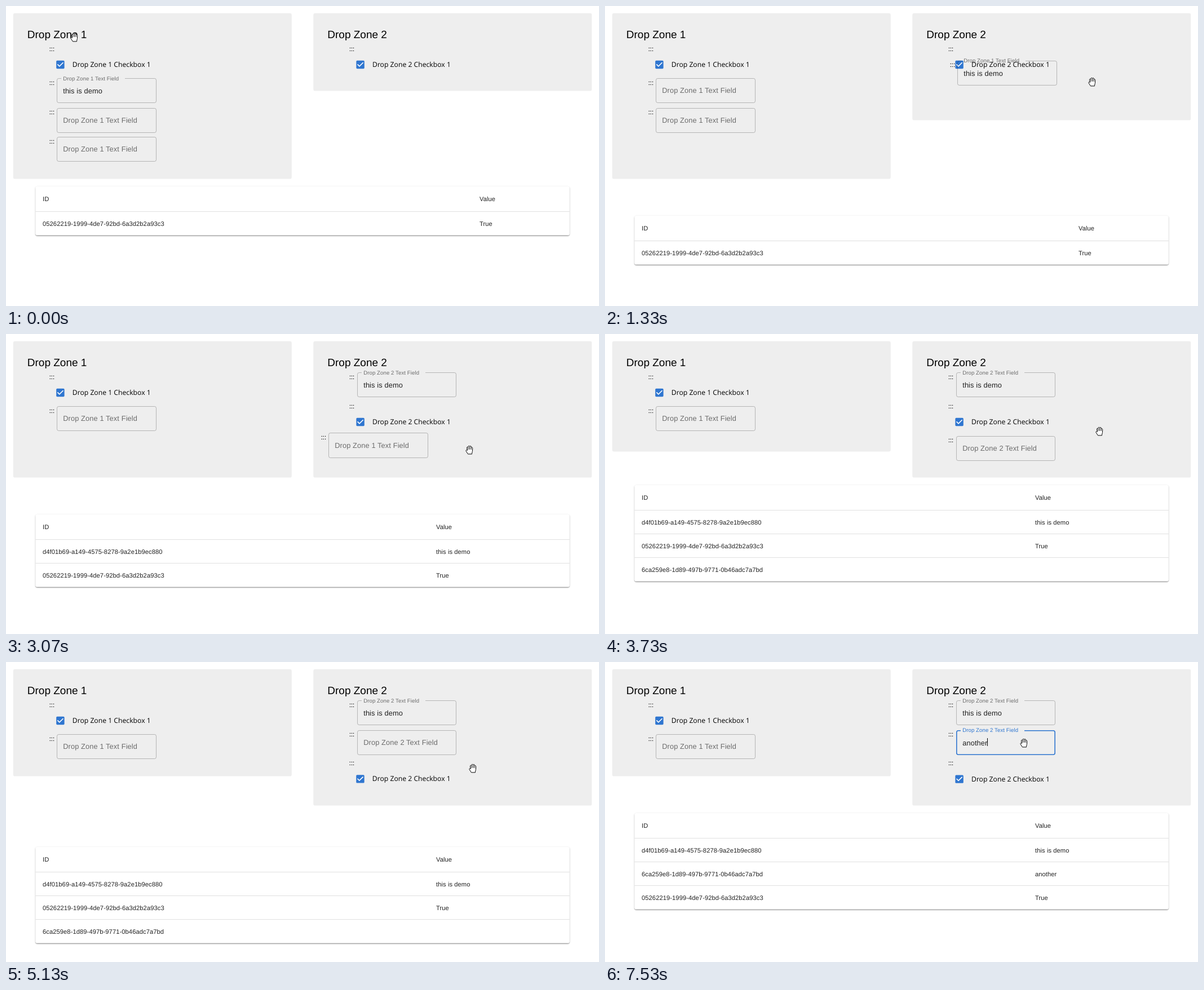
An HTML page with a canvas for the animation above (8000 ms loop, 1052x532 px).

```html
<!DOCTYPE html>
<html lang="en">
<head>
<meta charset="utf-8">
<title>Drop zones</title>
<style>
  html, body { margin: 0; width: 100%; height: 100%; overflow: hidden; background: #fff; }
  canvas { display: block; }
</style>
</head>
<body>
<canvas id="stage" width="1052" height="532"></canvas>
<script>
const ctx = document.getElementById('stage').getContext('2d', { alpha: false });
const LOOP = 8000;
const SANS = '"Liberation Sans", Arial, sans-serif';
const HUMANIST = '"Open Sans", "Noto Sans", sans-serif';
const BLUE = '#2f76d0', INK = 'rgba(0,0,0,.87)', MUTED = 'rgba(0,0,0,.55)';
const LEFT = 76.8, RIGHT = 609;      // x of the drag handles in each zone
const FIELD_H = 52, CHECK_H = 60, LIST_TOP = 68;

const span = (t, a, b) => Math.min(1, Math.max(0, (t - a) / (b - a)));
const easeOut = k => 1 - (1 - k) ** 2;
const smooth = k => k * k * (3 - 2 * k);
const mix = (a, b, k) => a + (b - a) * k;

const cursorPath = [
  [70, 121, 55], [550, 329, 165], [640, 329, 165], [870, 350, 165], [930, 350, 165],
  [1330, 864, 134], [1530, 862, 110], [1730, 856, 118], [1800, 850, 130],
  [2000, 774, 205], [2470, 340, 210], [2670, 340, 210],
  [3070, 822, 205], [3330, 872, 200], [3530, 877, 190], [3730, 877, 172],
  [4130, 850, 153], [4270, 850, 153], [4500, 846, 142], [4730, 838, 168], [4870, 838, 168],
  [5070, 828, 188], [5130, 828, 188], [5270, 743, 143]
];

const drags = [
  { from: [LEFT, 128], to: [RIGHT, 68], lift: 560, release: 1580, drop: 1880, height: FIELD_H, settle: 185 },
  { from: [LEFT, 180.5], to: [RIGHT, 180.5], lift: 2670, release: 3330, drop: 3598, height: FIELD_H, settle: 110 },
  { from: [RIGHT, 120], to: [RIGHT, 171.6], lift: 4270, release: 4950, drop: 5150, height: CHECK_H, settle: 110 }
];

const keyTimes = [6470, 6530, 6730, 7000, 7130, 7400, 7530];
const IDS = {
  check: '05262219-1999-4de7-92bd-6a3d2b2a93c3',
  demo: 'd4f01b69-a149-4575-8278-9a2e1b9ec880',
  another: '6ca259e8-1d89-497b-9771-0b46adc7a7bd'
};

function cursorAt(t) {
  const next = cursorPath.findIndex(key => key[0] > t);
  if (next === 0) return cursorPath[0].slice(1);
  if (next < 0) return cursorPath.at(-1).slice(1);
  const [t0, x0, y0] = cursorPath[next - 1], [t1, x1, y1] = cursorPath[next];
  const k = smooth(span(t, t0, t1));
  return [mix(x0, x1, k), mix(y0, y1, k)];
}

function carried({ from, to, lift, release, drop }, t) {
  if (t < lift) return from;
  const grab = cursorAt(lift), now = cursorAt(Math.min(t, release));
  const k = easeOut(span(t, release, drop));
  return from.map((v, i) => mix(v + now[i] - grab[i], to[i], k));
}

const remaining = (t, start, length) => 1 - easeOut(span(t, start, start + length));

function text(str, x, y, size, color = INK, family = SANS, spacing = 0) {
  ctx.font = `${size}px ${family}`;
  ctx.letterSpacing = `${spacing * size}px`;
  ctx.fillStyle = color;
  ctx.fillText(str, x, y);
  return ctx.measureText(str).width;
}

function box(x, y, w, h, r, color) {
  ctx.beginPath();
  ctx.roundRect(x, y, w, h, r);
  ctx.fillStyle = color;
  ctx.fill();
}

function line(x0, y0, x1, y1, color) {
  ctx.fillStyle = color;
  ctx.fillRect(x0, y0, x1 - x0 || 1, y1 - y0 || 1);
}

const handle = (x, y) => text(':::', x, y + 11.5, 11.5, '#000', HUMANIST);

function zone(x, bottom, number) {
  box(x, 12.8, 494, bottom - 12.8, 3.2, '#eee');
  text(`Drop Zone ${number}`, x + 25, 57, 19, '#000');
}

function checkbox([x, y], number) {
  handle(x, y);
  box(x + 12.4, y + 28.8, 14.4, 14.4, 1.6, BLUE);
  ctx.save();
  ctx.translate(x + 10, y + 26.4);
  ctx.scale(.8, .8);
  ctx.fillStyle = '#fff';
  ctx.fill(new Path2D('M10 17l-5-5 1.41-1.41L10 14.17l7.59-7.59L19 8z'));
  ctx.restore();
  text(`Drop Zone ${number} Checkbox 1`, x + 41, y + 40, 12.2, '#000', HUMANIST);
}

function field([x, y], number, { value = '', lifted = value ? 1 : 0, focused = false, caret = false } = {}) {
  handle(x, y);
  const left = Math.round(x + 13.5), right = Math.round(x + 190.1);
  const top = Math.round(y), bottom = Math.round(y + 44.4);
  const inset = focused ? .8 : .5, r = 3;
  const x0 = left + inset, y0 = top + inset, x1 = right - inset, y1 = bottom - inset;
  ctx.beginPath();
  ctx.moveTo(left + 8 + 113 * lifted, y0);
  ctx.arcTo(x1, y0, x1, y1, r);
  ctx.arcTo(x1, y1, x0, y1, r);
  ctx.arcTo(x0, y1, x0, y0, r);
  ctx.arcTo(x0, y0, x1, y0, r);
  ctx.lineTo(left + 8, y0);
  ctx.lineWidth = inset * 2;
  ctx.strokeStyle = focused ? BLUE : 'rgba(0,0,0,.24)';
  ctx.stroke();
  text(`Drop Zone ${number} Text Field`, left + 11.2, y + mix(26.4, 3.5, lifted),
    mix(12.8, 9.6, lifted), focused ? BLUE : MUTED, SANS, .00938);
  const width = text(value, left + 11.2, y + 27, 12.8, INK, SANS, .00938);
  if (caret) line(Math.round(left + 11 + width), top + 14, Math.round(left + 11 + width), top + 28, '#000');
}

function table(top, rows, valueX) {
  const x = 52.3, w = 947.5, h = 44 + 42 * rows.length + .6;
  for (const [dy, blur, alpha] of [[1.2, 1, .34], [.8, 2.4, .22]]) {
    ctx.save();
    ctx.shadowColor = `rgba(0,0,0,${alpha})`;
    ctx.shadowBlur = blur;
    ctx.shadowOffsetY = dy;
    box(x, top, w, h, 3.2, '#fff');
    ctx.restore();
  }
  const cells = (id, value, y) => {
    text(id, 65, y, 11.15, INK, SANS, .008);
    text(value, valueX, y, 11.15, INK, SANS, .008);
  };
  cells('ID', 'Value', top + 26);
  rows.forEach(([id, value], i) => {
    line(x, Math.round(top + 44 + 42 * i), x + w, Math.round(top + 44 + 42 * i), '#e0e0e0');
    cells(id, value, top + 69.5 + 42 * i);
  });
}

function pointer(t) {
  const [x, y] = cursorAt(t);
  ctx.save();
  ctx.translate(x + .5, y + .4);
  ctx.fillStyle = '#fff';
  ctx.strokeStyle = '#000';
  ctx.lineWidth = 1;
  ctx.lineJoin = 'round';
  const arrow = t > 1880 && t < 2300;
  const shape = new Path2D(arrow
    ? 'M.5 .5V11.5L3 9.2 4.8 13.2 6.8 12.3 5 8.4H8.5Z'
    : 'M-3 7.5L-6.5 2C-7 .2-5-.4-4 1.2L-5-3.5C-5.2-5.3-3.2-5.6-2.7-4L-2.5-5.8C-2.3-7.4-.2-7.4 0-5.8' +
      'L.3-5.8C.6-7.4 2.6-7.2 2.6-5.4L2.8-4C3.4-5.2 5.2-4.8 5.2-3L5 2C4.8 4 4 5 4 7.5Z');
  ctx.fill(shape);
  ctx.stroke(shape);
  if (!arrow) ctx.stroke(new Path2D('M-2.6-4V-.5M.1-5.5V-.5M2.7-4V-.5'));
  ctx.restore();
}

function draw(t) {
  const [first, second, third] = drags;
  const dropped = drags.map(d => t >= d.drop);
  const typed = 'another'.slice(0, keyTimes.filter(k => t >= k).length);

  ctx.fillStyle = '#fff';
  ctx.fillRect(0, 0, 1052, 532);

  const leftBottom = 203 + FIELD_H * (remaining(t, first.drop, 200) + remaining(t, second.drop, 200)) - .4;
  const rightBottom = 151 + (t >= 1130) * FIELD_H + (t >= 2930) * FIELD_H - .4;
  zone(12.8, leftBottom, 1);
  zone(545.3, rightBottom, 2);

  const slack = drags.reduce((sum, d) =>
    sum + (t < d.lift ? 0 : d.height * remaining(t, d.drop, d.settle)), 0);
  const rows = [[IDS.check, 'True']];
  if (dropped[0]) rows.unshift([IDS.demo, 'this is demo']);
  if (dropped[1]) rows.splice(dropped[2] ? 1 : 2, 0, [IDS.another, typed]);
  table(Math.round(Math.max(leftBottom, rightBottom) + 13.4 + slack), rows, dropped[0] ? 763 : 840);

  checkbox([LEFT, LIST_TOP], 1);
  const closeGap = smooth(span(t, 1000, 1200));
  field([LEFT, mix(180.5, 128, closeGap)], 1);
  const secondHome = t < second.lift ? [LEFT, mix(232, 180.5, closeGap)] : carried(second, t);
  const makeRoom = FIELD_H * smooth(span(t, 1380, 1580));
  const rise = CHECK_H * smooth(span(t, 4870, 5070));

  checkbox(t < third.lift ? [RIGHT, LIST_TOP + makeRoom] : carried(third, t), 2);
  const focused = t >= 5600;
  field([secondHome[0], secondHome[1] - rise], dropped[1] ? 2 : 1, {
    value: typed,
    lifted: easeOut(span(t, 5600, 5800)),
    focused,
    caret: focused && (t < 6070 || t >= keyTimes[0])
  });
  field(carried(first, t), dropped[0] ? 2 : 1, { value: 'this is demo' });
  pointer(t);
}

function frame() {
  draw(performance.now() % LOOP);
  requestAnimationFrame(frame);
}
ctx.textRendering = 'geometricPrecision';
frame();
</script>
</body>
</html>
```
